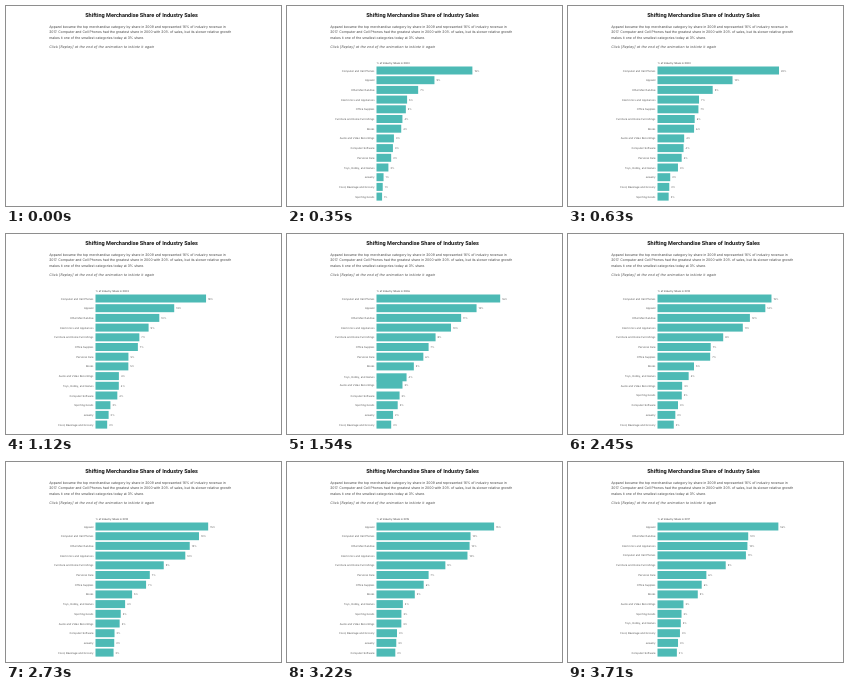
These frames come from a looping animation (275 px wide and 200 px high, 3.78 s). An HTML page:

```html
<!DOCTYPE html>
<html lang="en">
<head>
<meta charset="utf-8">
<title>Shifting Merchandise Share of Industry Sales</title>
<style>
  html, body { margin: 0; width: 100%; height: 100%; overflow: hidden; background: #fff; }
  svg { display: block; width: 275px; height: 200px; }
  text { font-family: Inter, Roboto, sans-serif; text-rendering: geometricPrecision; fill: #555; }
  .title { font: 700 5.55px Roboto, sans-serif; fill: #111; text-anchor: middle; }
  .intro { font-size: 3.45px; }
  .intro text { fill: #444; }
  .note { font-style: italic; letter-spacing: 0.14px; }
  .axis { font-size: 2.5px; fill: #333; }
  .name { font-size: 2.6px; text-anchor: end; }
  .value { font-size: 2.5px; }
  rect { fill: #4dbab5; }
</style>
</head>
<body>
<svg viewBox="0 0 275 200">
  <text class="title" x="135.5" y="11.2">Shifting Merchandise Share of Industry Sales</text>
  <g class="intro">
    <text x="43.2" y="21.7">Apparel became the top merchandise category by share in 2009 and represented 16% of industry revenue in</text>
    <text x="43.2" y="27.2">2017. Computer and Cell Phones had the greatest share in 2000 with 20% of sales, but its slower relative growth</text>
    <text x="43.2" y="32.7">makes it one of the smallest categories today at 3% share.</text>
    <text class="note" x="43.2" y="42">Click [Replay] at the end of the animation to initiate it again</text>
  </g>
  <g id="chart">
    <text class="axis" id="axis" x="89.5" y="57.6"></text>
  </g>
</svg>
<script>
const LOOP = 3780, STEP = 70;
const FIRST_MOVE = 840, GAP = 532, MOVE = 245, GROW = 560;
const LEFT = 89.5, TOP = 60.5, PITCH = 9.7, BAR = 8;

// percent share in 2000, 2006 and 2017
const categories = [
  ['Computer and Cell Phones', 19.6, 16.2, 11.4],
  ['Apparel', 12.1, 13.3, 15.6],
  ['Other Merchandise', 8.9, 11.3, 11.7],
  ['Electronics and Appliances', 6.7, 10, 11.6],
  ['Office Supplies', 6.6, 6.9, 5.7],
  ['Furniture and Home Furnishings', 6, 7.9, 8.8],
  ['Books', 5.9, 4.9, 5.2],
  ['Audio and Video Recordings', 4.3, 3.4, 3.35],
  ['Computer Software', 4.2, 3, 2.5],
  ['Personal Care', 3.9, 6.3, 6.3],
  ['Toys, Hobby, and Games', 3.3, 4, 3],
  ['Jewelry', 2.05, 2.2, 2.65],
  ['Food, Beverage and Grocery', 1.9, 1.95, 2.9],
  ['Sporting Goods', 1.8, 2.85, 3.1]
];

const lerp = (a, b, p) => a + (b - a) * p;
const clamp = p => Math.max(0, Math.min(1, p));
const ease = p => p < 0.5 ? 4 * p ** 3 : 1 - 4 * (1 - p) ** 3;

// parabola through the three known shares, y in years since 2000
const share = ([, a, b, c], y) =>
  a * (y - 6) * (y - 17) / 102 - b * y * (y - 17) / 66 + c * y * (y - 6) / 187;

// one chart every third year, ending with 2017
const charts = Array.from({ length: 7 }, (_, n) => {
  const y = Math.min(3 * n, 17);
  const shares = categories.map(c => share(c, y));
  const unit = y < 6 ? 6.2 : 7.75; // pixels per percent
  const bars = shares.map(s => ({
    share: s,
    width: s * unit,
    rank: shares.filter(v => v > s).length
  }));
  return { year: 2000 + y, bars };
});

const chart = document.getElementById('chart');
const axis = document.getElementById('axis');

function add(parent, tag, attrs) {
  const el = document.createElementNS('http://www.w3.org/2000/svg', tag);
  for (const key in attrs) el.setAttribute(key, attrs[key]);
  return parent.appendChild(el);
}

const rows = categories.map(([name]) => {
  const group = add(chart, 'g', {});
  add(group, 'text', { class: 'name', x: LEFT - 2, y: 5 }).textContent = name;
  return {
    group,
    bar: add(group, 'rect', { x: LEFT, height: BAR }),
    value: add(group, 'text', { class: 'value', y: 5 })
  };
});

function place(row, from, to, p) {
  const width = lerp(from.width, to.width, p);
  row.group.setAttribute('transform', `translate(0 ${TOP + lerp(from.rank, to.rank, p) * PITCH})`);
  row.bar.setAttribute('width', width);
  row.value.setAttribute('x', LEFT + width + 2);
  row.value.textContent = Math.round(lerp(from.share, to.share, p)) + '%';
}

function draw(t) {
  chart.style.display = t ? '' : 'none';
  const n = Math.max(0, Math.floor((t - FIRST_MOVE) / GAP) + 1);
  const { year, bars } = charts[n];
  axis.textContent = `% of Industry Share in ${year}`;
  const moved = t - FIRST_MOVE - (n - 1) * GAP;
  rows.forEach((row, i) => {
    const to = bars[i];
    if (n) {
      place(row, charts[n - 1].bars[i], to, ease(clamp(moved / MOVE)));
    } else {
      // bars grow in, lower rows slightly later
      const p = ease(clamp((t - STEP * i / 13) / GROW));
      place(row, { share: 0, width: 0, rank: to.rank }, to, p);
    }
  });
}

const began = performance.now();
function tick() {
  const t = (performance.now() - began) % LOOP;
  draw(Math.floor(t / STEP) * STEP);
  requestAnimationFrame(tick);
}
tick();
</script>
</body>
</html>
```
